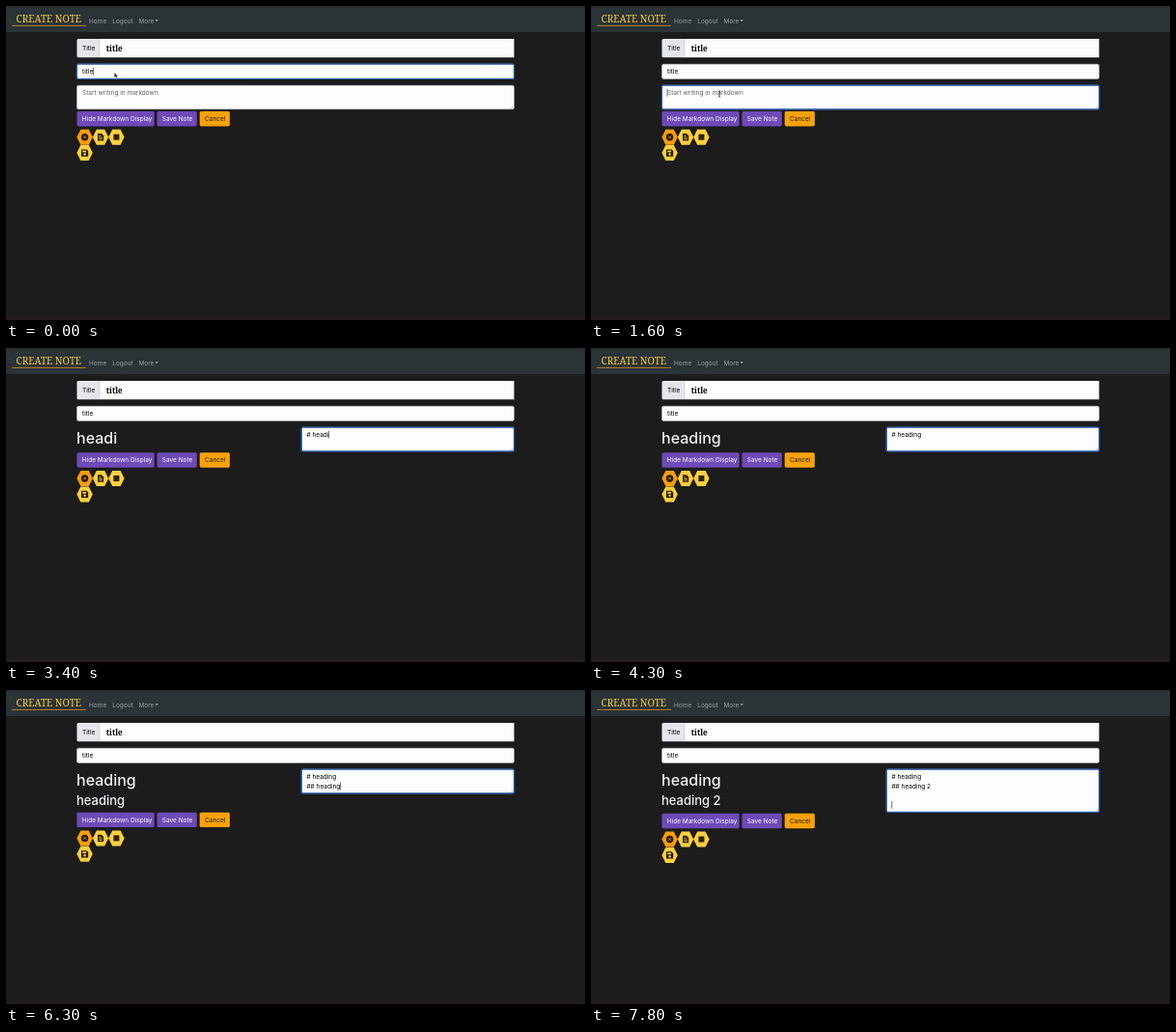
Recreate the animation shown at these times as an HTML page. Size 600x325 px, loop 8000 ms.

```html
<!DOCTYPE html>
<html lang="en">
<meta charset="utf-8">
<title>Create note</title>
<style>
  html, body { margin: 0; height: 100%; overflow: hidden; background: #1c1c1c; }
  svg { display: block; width: 600px; height: 325px; }
  text { font: 6.5px Inter, sans-serif; white-space: pre; }
  .brand { font: 10px "Noto Serif", serif; fill: #f7cb45; }
  .nav { fill: #9a9fa2; }
  .bold { font: bold 8.1px "Noto Serif", serif; }
  .h1, .h2 { font-weight: 500; fill: #f0eff5; }
  .h1 { font-size: 16px; }
  .h2 { font-size: 13px; }
  .hint { fill: #5d6267; }
  .field { fill: #fdfdfe; stroke: #c9ced4; stroke-width: .4; }
  .ring { fill: none; stroke: #2f65b8; stroke-width: 1.3; }
</style>
<svg viewBox="0 0 600 325">
  <defs>
    <path id="hex" d="M-8.2 0-4.2-8H4.2L8.2 0 4.2 8H-4.2Z"/>
  </defs>
  <rect width="600" height="325" fill="#1c1c1c"/>
  <rect width="600" height="27" fill="#2a3336"/>
  <rect width="600" height="2" fill="#2d2b2c"/>
  <rect y="323" width="600" height="2" fill="#281c20"/>
  <text class="brand" x="10.5" y="17.4">CREATE NOTE</text>
  <path d="M6 20.4H83" stroke="#c98a1c" stroke-width=".9"/>
  <g class="nav">
    <text x="86" y="17.6">Home</text>
    <text x="110.3" y="17.6">Logout</text>
    <text x="137.5" y="17.6">More</text>
    <path d="M154.3 14.3h3.8l-1.9 2Z"/>
  </g>

  <path d="M97 34H526.5V53.3H97Z" fill="#fdfdfc"/>
  <path d="M97 34H75q-1.5 0-1.5 1.5v16.3q0 1.5 1.5 1.5H97Z" fill="#e5e6eb"/>
  <path d="M97 34v19.3" stroke="#b9bcc3" stroke-width=".5"/>
  <text x="79" y="46.2">Title</text>
  <text class="bold" x="103.8" y="46.6">title</text>

  <rect class="field" x="73.5" y="60.2" width="453" height="15.2" rx="1.6"/>
  <rect class="ring" id="titleRing" x="73.5" y="60.2" width="453" height="15.2" rx="1.6"/>
  <text id="titleText" x="79" y="70.1">title</text>

  <g id="area">
    <rect class="field" y="82.2" rx="1.6"/>
    <rect class="ring" y="82.2" rx="1.6"/>
    <path id="grip" d="M-3.2-.9l2.3-2.3M-1.7-.9l.8-.8" stroke="#777" stroke-width=".4"/>
  </g>
  <text id="hint" class="hint" x="79" y="92.2">Start writing in markdown</text>
  <g id="lines"><text/><text/><text/><text/></g>
  <path id="caret" d="M0-6.4V1.4" stroke="#111" stroke-width=".6"/>

  <text id="h1" class="h1" x="73" y="99"/>
  <text id="h2" class="h2" x="73" y="118.7"/>

  <g id="below">
    <g fill="#6f4ab8">
      <rect x="73.5" y="109" width="80.2" height="15.4" rx="1.6"/>
      <rect x="156.5" y="109" width="41.3" height="15.4" rx="1.6"/>
      <rect x="200.7" y="109" width="31.2" height="15.4" rx="1.6" fill="#f9a108"/>
    </g>
    <g fill="#fff">
      <text x="78.8" y="119.1">Hide Markdown Display</text>
      <text x="161.8" y="119.1">Save Note</text>
      <text x="206" y="119.1" fill="#1c1c1c">Cancel</text>
    </g>
    <g transform="translate(81.6 135.7)">
      <use href="#hex" fill="#f99d0c"/>
      <circle r="3.7" fill="#241c10"/>
      <path d="M-1.3-1.3 1.3 1.3M1.3-1.3-1.3 1.3" stroke="#f99d0c" stroke-width=".8"/>
    </g>
    <g transform="translate(98 135.7)">
      <use href="#hex" fill="#ffcf3f"/>
      <path d="M-3-3.7H1L3.2-1.4V3.7H-3Z" fill="#2a2412"/>
      <path d="M-1.7-1.2H.4M-1.7.5H1.8M-1.7 2.1H1.8" stroke="#ffcf3f" stroke-width=".7"/>
    </g>
    <g transform="translate(114.4 135.7)">
      <use href="#hex" fill="#ffcf3f"/>
      <rect x="-3" y="-3" width="6" height="6" fill="#2a2412"/>
    </g>
    <g transform="translate(81.6 152.1)">
      <use href="#hex" fill="#ffcf3f"/>
      <path d="M-3.6-3.6H2L3.6-2V3.6H-3.6Z" fill="#1d1a10"/>
      <path d="M-2.4-2.5H1.5V-.7H-2.4Z" fill="#ffcf3f"/>
      <circle cy="1.4" r="1.2" fill="#ffcf3f"/>
    </g>
  </g>

  <g id="pointer">
    <path id="arrow" d="M0 0V5.2L1.3 4.1 2.2 6 3.1 5.6 2.2 3.7H3.9Z" fill="#000" stroke="#fff" stroke-width=".4"/>
    <path id="beam" d="M-1.2-3.2Q0-3.2 0-2.4 0-3.2 1.2-3.2M0-2.4V2.4M-1.2 3.2Q0 3.2 0 2.4 0 3.2 1.2 3.2" fill="none" stroke="#222" stroke-width=".7"/>
  </g>
</svg>
<script>
const LOOP = 8000, FOCUS = 700, BLINK = 400, LINE = 9.75;
const NOTE = "# heading\n## heading 2\n\n";
// when each character of the note is typed
const KEYS = [1800, 2200, 2600, 2800, 3000, 3200, 3400, 3600, 3700, 3900,
  4800, 5000, 5200, 5400, 5500, 5600, 5800, 6000, 6200, 6300, 6700, 7100, 7400, 7600];

const $ = id => document.getElementById(id);
const set = (el, attrs) => { for (const k in attrs) el.setAttribute(k, attrs[k]); };
const show = (el, on) => set(el, { visibility: on ? "visible" : "hidden" });
const move = (el, x, y) => set(el, { transform: `translate(${x} ${y})` });
const clamp = v => Math.max(0, Math.min(1, v));
const [box, ring] = $("area").children;
const rows = [...$("lines").children];

function render(t) {
  const typed = KEYS.filter(k => k <= t).length;
  const lines = NOTE.slice(0, typed).split("\n");
  const split = typed > 0, focused = t >= FOCUS;
  const fade = clamp((t - FOCUS) / 150);

  // editor
  const left = split ? 306.3 : 73.5, height = 24.6 + Math.max(0, lines.length - 2) * LINE;
  for (const r of [box, ring]) set(r, { x: left, width: 526.5 - left, height });
  move($("grip"), 526.5, 82.2 + height);
  set(ring, { opacity: fade });
  set($("titleRing"), { opacity: 1 - fade });
  show($("hint"), !split);
  rows.forEach((row, i) => {
    set(row, { x: left + 5.2, y: 92.2 + i * LINE });
    row.textContent = lines[i] || "";
  });

  // caret
  const last = typed ? KEYS[typed - 1] : focused ? FOCUS : 0;
  const n = lines.length - 1, host = focused ? rows[n] : $("titleText");
  const width = host.textContent ? host.getComputedTextLength() : 0;
  move($("caret"), +host.getAttribute("x") + width + .3, +host.getAttribute("y"));
  show($("caret"), (t - last) % (2 * BLINK) < BLINK);

  // preview
  const heading = (i, mark) => (lines[i] || "").slice(mark.length).trim();
  const second = heading(1, "## ");
  $("h1").textContent = heading(0, "# ");
  $("h2").textContent = second;
  move($("below"), 0, lines.length > 3 ? 18.8 : second ? 17.7 : split ? -.7 : 0);

  // pointer
  const p = clamp(t / 400), ease = p * p * (3 - 2 * p);
  move($("pointer"), 112.3 + 20.7 * ease, 69 + 22 * ease);
  show($("arrow"), !split && t < 250);
  show($("beam"), !split && t >= 250);
}

function tick(now) {
  render(now % LOOP);
  requestAnimationFrame(tick);
}
requestAnimationFrame(tick);
</script>
</html>
```
